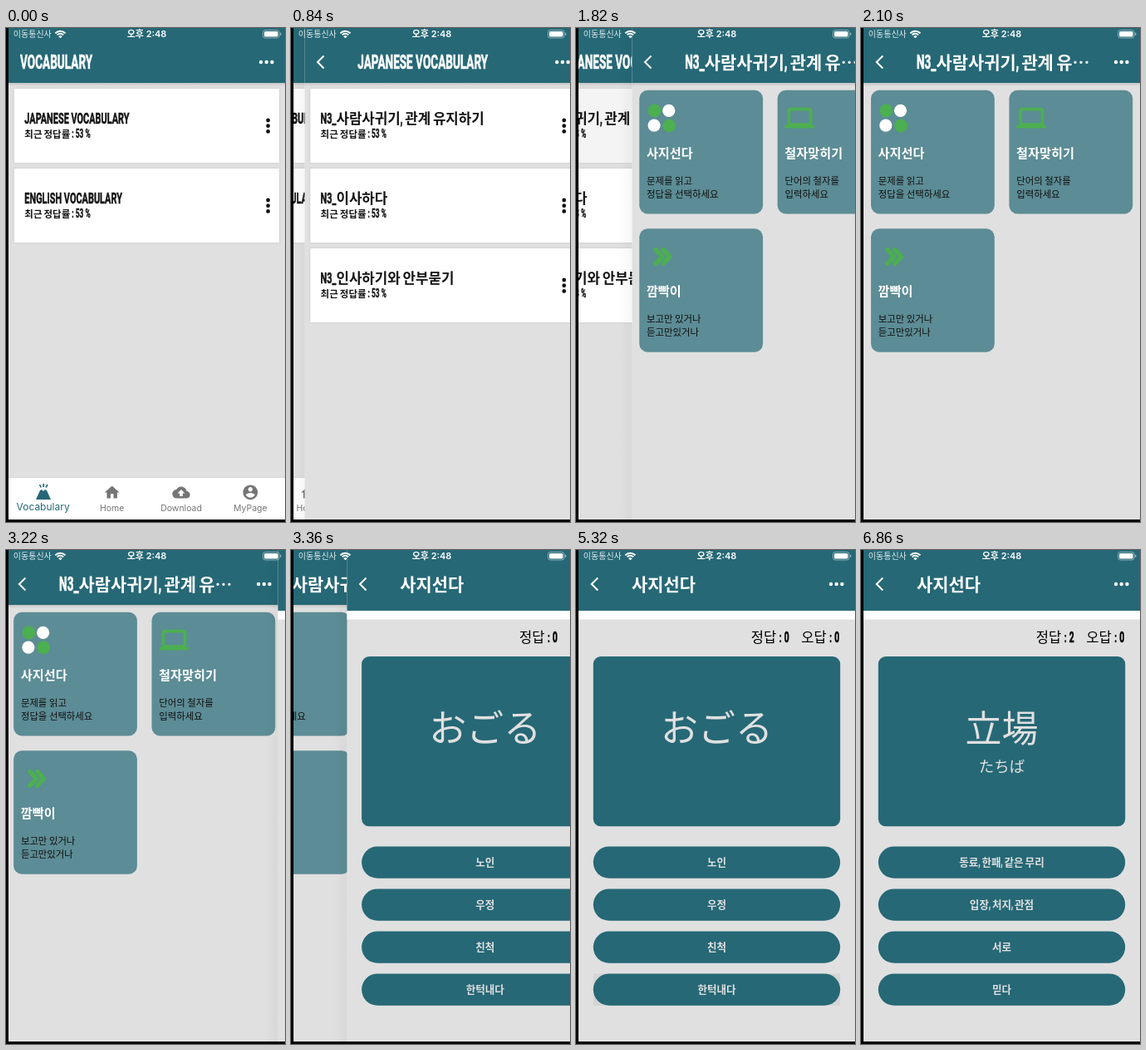
Animation of 336 by 594 pixels, one loop 8000 ms. Source, as an HTML page with a canvas:

```html
<!DOCTYPE html>
<html lang="ko">
<head>
<meta charset="utf-8">
<title>Vocabulary</title>
<style>
html, body { margin: 0; width: 100%; height: 100%; overflow: hidden; background: #000; }
canvas { display: block; width: 336px; height: 594px; }
</style>
</head>
<body>
<canvas id="stage"></canvas>
<script>
const W = 336, H = 594, LEFT = 3, BOTTOM = 591, PAGE = W - LEFT, MID = 169.5, LOOP = 8000;
const TEAL = '#266876', TILE = '#5c8c95', BG = '#e0e0e0', GREEN = '#4caf50', INK = '#141414', GRAY = '#757575';
const KR = '"Noto Sans CJK KR", "Noto Sans KR", "Noto Sans CJK", sans-serif';
const JP = '"Noto Sans CJK JP", "Noto Sans JP", "Noto Sans CJK", sans-serif';
const UI = 'Inter, Roboto, sans-serif';
const NARROW = 0.59, HANGUL = 0.91;

const ICONS = {
  home: 'M10 20v-6h4v6h5v-8h3L12 3 2 12h3v8z',
  cloud: 'M19.35 10.04C18.67 6.59 15.64 4 12 4 9.11 4 6.6 5.64 5.35 8.04 2.34 8.36 0 10.91 0 14c0 3.31 2.69 6 6 6h13c2.76 0 5-2.24 5-5 0-2.64-2.05-4.78-4.65-4.96zM14 13v4h-4v-4H7l5-5 5 5h-3z',
  person: 'M12 2C6.48 2 2 6.48 2 12s4.48 10 10 10 10-4.48 10-10S17.52 2 12 2zm0 3c1.66 0 3 1.34 3 3s-1.34 3-3 3-3-1.34-3-3 1.34-3 3-3zm0 14.2c-2.5 0-4.71-1.28-6-3.22.03-1.99 4-3.08 6-3.08 1.99 0 5.99 1.09 6 3.08-1.29 1.94-3.5 3.22-6 3.22z'
};

const QUIZ = [
  { from: 0, word: 'おごる', size: 45, options: ['노인', '우정', '친척', '한턱내다'] },
  { from: 5530, word: '相手', kana: 'あいて', size: 44, options: ['약속', '상대', '동료', '여기다'] },
  { from: 6860, word: '立場', kana: 'たちば', size: 44, options: ['동료, 한패, 같은 무리', '입장, 처지, 관점', '서로', '믿다'] }
];

const canvas = document.getElementById('stage');
const ctx = canvas.getContext('2d');
const dpr = window.devicePixelRatio || 1;
canvas.width = W * dpr;
canvas.height = H * dpr;

function rect(x, y, w, h, color) {
  ctx.fillStyle = color;
  ctx.fillRect(x, y, w, h);
}

function round(x, y, w, h, r, color) {
  ctx.fillStyle = color;
  ctx.beginPath();
  ctx.roundRect(x, y, w, h, r);
  ctx.fill();
}

function dot(x, y, r, color) {
  ctx.fillStyle = color;
  ctx.beginPath();
  ctx.arc(x, y, r, 0, Math.PI * 2);
  ctx.fill();
}

function line(points, width, color, cap = 'butt') {
  ctx.strokeStyle = color;
  ctx.lineWidth = width;
  ctx.lineCap = cap;
  ctx.lineJoin = cap === 'round' ? 'round' : 'miter';
  ctx.beginPath();
  points.forEach(([x, y]) => ctx.lineTo(x, y));
  ctx.stroke();
}

function text(s, x, y, font, color, align = 'left') {
  ctx.font = font;
  ctx.fillStyle = color;
  ctx.textAlign = align;
  ctx.fillText(s, x, y);
}

// Title face: condensed Latin mixed with bold Hangul on one baseline.
function title(s, x, y, size, color, align = 'left', hangul = HANGUL) {
  const runs = s.match(/[\x20-\x7e]+|[^\x20-\x7e]+/g).map(part => {
    const latin = part.charCodeAt(0) < 127;
    const font = latin ? `bold ${size}px Roboto, sans-serif` : `bold ${size * hangul}px ${KR}`;
    const k = latin ? NARROW : 1;
    ctx.font = font;
    return { part, latin, font, k, w: ctx.measureText(part).width * k };
  });
  if (align === 'center') x -= runs.reduce((sum, r) => sum + r.w, 0) / 2;
  for (const r of runs) {
    ctx.save();
    ctx.translate(x, y);
    ctx.scale(r.k, 1);
    text(r.part, 0, 0, r.font, color);
    if (r.latin) {
      ctx.strokeStyle = color;
      ctx.lineWidth = size * 0.03;
      ctx.lineJoin = 'round';
      ctx.strokeText(r.part, 0, 0);
    }
    ctx.restore();
    x += r.w;
  }
}

function icon(name, cx, cy, color) {
  ctx.save();
  ctx.translate(cx, cy);
  ctx.scale(0.888, 0.888);
  ctx.translate(-12, -12);
  ctx.fillStyle = color;
  ctx.fill(new Path2D(ICONS[name]), 'evenodd');
  ctx.restore();
}

function header(label, back, height = 66) {
  if (height === 66) {
    const g = ctx.createLinearGradient(0, 66, 0, 70);
    g.addColorStop(0, 'rgba(0,0,0,.13)');
    g.addColorStop(1, 'rgba(0,0,0,0)');
    rect(LEFT, 66, PAGE, 4, g);
  }
  rect(LEFT, 0, PAGE, height, TEAL);
  if (back) line([[26.3, 33.5], [18.8, 41], [26.3, 48.5]], 2, '#fff');
  title(label, back ? 67 : 17, 48.8, 23, '#fff');
  for (const x of [307, 313.7, 320.4]) dot(x, 41, 2.2, '#fff');
}

function card(i, label, pressed) {
  const y = 73 + i * 96;
  ctx.save();
  ctx.shadowColor = 'rgba(0,0,0,.12)';
  ctx.shadowBlur = 2 * dpr;
  ctx.shadowOffsetY = 0.4 * dpr;
  rect(10, y, 319, 89, pressed ? '#f4f4f4' : '#fff');
  ctx.restore();
  title(label, 22.3, y + 42.3, 18.5, INK);
  title('최근 정답률 : 53 %', 22.3, y + 59, 14.2, INK, 'left', 0.81);
  for (const d of [38, 44.7, 51.4]) dot(315.6, y + d, 2.4, INK);
}

function navBar() {
  rect(LEFT, 540.5, PAGE, 1, '#d2d2d2');
  rect(LEFT, 541, PAGE, 50, '#fff');
  ctx.fillStyle = TEAL;
  ctx.beginPath();
  ctx.moveTo(36, 567);
  for (const [x, y] of [[41, 556], [43, 555], [45, 557], [47, 555], [49, 556], [54, 567]]) ctx.lineTo(x, y);
  ctx.fill();
  line([[45.2, 548], [45.2, 552]], 1.8, TEAL);
  line([[40.5, 549], [42.3, 552.5]], 1.6, TEAL);
  line([[50, 549], [48.1, 552.5]], 1.6, TEAL);
  icon('home', 127.7, 558.5, GRAY);
  icon('cloud', 211, 558.5, GRAY);
  icon('person', 294.3, 558.3, GRAY);
  text('Vocabulary', 44.6, 580.3, `12px ${UI}`, TEAL, 'center');
  ['Home', 'Download', 'MyPage'].forEach((s, i) =>
    text(s, 127.7 + i * 83.3, 580.5, `10.5px ${UI}`, GRAY, 'center'));
}

function homePage(t) {
  header('VOCABULARY', false);
  card(0, 'JAPANESE VOCABULARY', t > 600 && t < 800);
  card(1, 'ENGLISH VOCABULARY');
  navBar();
}

function listPage(t) {
  header('JAPANESE VOCABULARY', true);
  card(0, 'N3_사람사귀기, 관계 유지하기', t > 1670 && t < 1950);
  card(1, 'N3_이사하다');
  card(2, 'N3_인사하기와 안부묻기');
}

function tile(x, y, label, lines, draw) {
  round(x, y, 148.8, 148.6, 10, TILE);
  ctx.save();
  ctx.translate(x, y);
  draw();
  ctx.restore();
  text(label, x + 8.6, y + 80.7, `bold 15.2px ${KR}`, '#fff');
  lines.forEach((s, i) => text(s, x + 8.8, y + 112.7 + i * 16, `11.4px ${KR}`, '#101010'));
}

function fourDots() {
  dot(18.3, 24.5, 7.9, GREEN);
  dot(35.5, 24.5, 7.6, '#fff');
  dot(17.8, 42.3, 7.6, '#fff');
  dot(36, 42.5, 7.9, GREEN);
}

function laptop() {
  ctx.strokeStyle = GREEN;
  ctx.lineWidth = 3.7;
  ctx.beginPath();
  ctx.roundRect(13.6, 22.8, 26.4, 18.6, 2.5);
  ctx.stroke();
  round(8.6, 42, 36, 3.8, [0, 0, 2, 2], GREEN);
}

function chevrons() {
  for (const x of [19.6, 28.6]) line([[x, 25.2], [x + 8, 33.7], [x, 42.2]], 5.2, GREEN, 'round');
}

function modePage() {
  header('N3_사람사귀기, 관계 유⋯', true);
  tile(12, 74.8, '사지선다', ['문제를 읽고', '정답을 선택하세요'], fourDots);
  tile(178.4, 74.8, '철자맞히기', ['단어의 철자를', '입력하세요'], laptop);
  tile(12, 241.2, '깜빡이', ['보고만 있거나', '듣고만있거나'], chevrons);
}

function score(x, label, n) {
  text(label, x, 110.5, `16.6px ${KR}`, '#000');
  title(':', x + 34, 110.5, 17, '#000');
  title(String(n), x + 40, 111, 17.5, '#000');
}

function quizPage(t) {
  const step = QUIZ.filter(q => t >= q.from).length - 1;
  const q = QUIZ[step];
  header('사지선다', true, 73);
  rect(LEFT, 73, PAGE, 10.5, '#fff');
  score(210.7, '정답', step);
  score(271.2, '오답', 0);
  round(20.8, 128, 297.4, 204.3, 9, TEAL);
  text(q.word, MID, q.kana ? 230.5 : 231, `${q.size}px ${JP}`, BG, 'center');
  if (q.kana) text(q.kana, MID, 266.5, `18.5px ${JP}`, BG, 'center');
  if (t >= 5320 && t < 5600) rect(20.8, 509.5, 297.4, 38.3, '#d5d5d5');
  q.options.forEach((s, i) => {
    const y = 356.4 + i * 51;
    round(20.8, y, 297.4, 38.4, 19.2, TEAL);
    title(s, MID, y + 23.6, 13.8, BG, 'center');
  });
}

function statusBar() {
  text('이동통신사', 8.8, 11.2, `10px ${KR}`, '#e6eef0');
  ctx.strokeStyle = '#fff';
  ctx.lineCap = 'butt';
  ctx.lineWidth = 1.9;
  for (const r of [8.3, 5.2]) {
    ctx.beginPath();
    ctx.arc(65.4, 12, r, -Math.PI * 0.76, -Math.PI * 0.24);
    ctx.stroke();
  }
  ctx.fillStyle = '#fff';
  ctx.beginPath();
  ctx.moveTo(65.4, 12.3);
  ctx.arc(65.4, 12, 2.9, -Math.PI * 0.78, -Math.PI * 0.22);
  ctx.fill();
  text('오후 2:48', MID, 11.4, `600 11px Inter, ${KR}`, '#fff', 'center');
  ctx.strokeStyle = 'rgba(255,255,255,.45)';
  ctx.lineWidth = 1;
  ctx.beginPath();
  ctx.roundRect(309.5, 2.5, 19.5, 9.5, 2.8);
  ctx.stroke();
  round(311, 4, 16.5, 6.5, 1.5, '#fff');
  round(330, 5.6, 1.3, 3.4, 0.7, 'rgba(255,255,255,.5)');
}

const bezier = (a, b, u) => 3 * (1 - u) * (1 - u) * u * a + 3 * (1 - u) * u * u * b + u * u * u;

// cubic-bezier(.35, .91, .33, .97)
function ease(x) {
  if (x <= 0) return 0;
  if (x >= 1) return 1;
  let lo = 0, hi = 1;
  for (let i = 0; i < 24; i++) {
    const u = (lo + hi) / 2;
    if (bezier(0.35, 0.33, u) < x) lo = u; else hi = u;
  }
  return bezier(0.91, 0.97, lo);
}

const PAGES = [
  { start: -400, draw: homePage },
  { start: 595, draw: listPage },
  { start: 1677, draw: modePage },
  { start: 3217, draw: quizPage }
];

function drawPage(page, dx, t) {
  ctx.save();
  ctx.translate(dx, 0);
  if (dx > 0) {
    const g = ctx.createLinearGradient(LEFT - 16, 0, LEFT, 0);
    g.addColorStop(0, 'rgba(0,0,0,0)');
    g.addColorStop(1, 'rgba(0,0,0,.035)');
    rect(LEFT - 16, 0, 16, BOTTOM, g);
  }
  ctx.beginPath();
  ctx.rect(LEFT, 0, PAGE, BOTTOM);
  ctx.clip();
  rect(LEFT, 0, PAGE, BOTTOM, BG);
  page.draw(t);
  ctx.restore();
}

function render(t) {
  ctx.setTransform(dpr, 0, 0, dpr, 0, 0);
  rect(0, 0, W, H, '#000');
  ctx.save();
  ctx.beginPath();
  ctx.rect(LEFT, 0, PAGE, BOTTOM);
  ctx.clip();
  const top = PAGES.filter(p => t >= p.start).length - 1;
  const p = ease((t - PAGES[top].start) / 400);
  if (p < 1) drawPage(PAGES[top - 1], -p * PAGE / 3, t);
  drawPage(PAGES[top], (1 - p) * PAGE, t);
  statusBar();
  ctx.restore();
}

const began = performance.now();
function tick() {
  render((performance.now() - began) % LOOP);
  requestAnimationFrame(tick);
}
tick();
</script>
</body>
</html>
```
